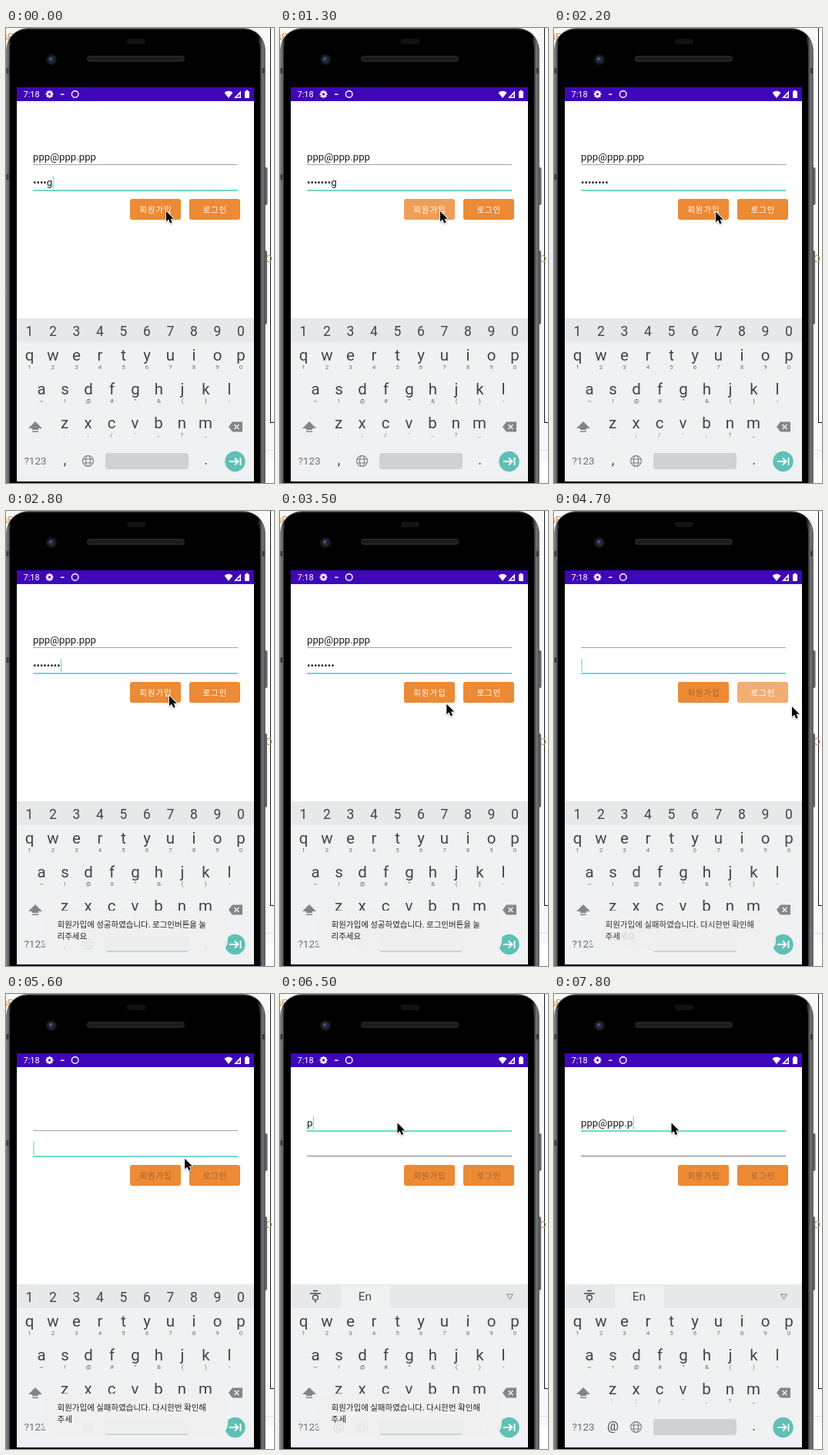
Recreate the animation shown at these times as an HTML page with a canvas. Size 348 by 591 pixels, loop 8000 ms.

```html
<!DOCTYPE html>
<html lang="ko">
<head>
<meta charset="utf-8">
<title>Sign-up demo</title>
<style>
html, body { margin: 0; width: 100%; height: 100%; overflow: hidden; background: #f8f8f8; }
canvas { display: block; width: 348px; height: 591px; }
</style>
</head>
<body>
<canvas id="stage"></canvas>
<script>
const W = 348, H = 591, LOOP = 8000, STEP = 100;
const canvas = document.getElementById('stage');
const dpr = window.devicePixelRatio || 1;
canvas.width = W * dpr;
canvas.height = H * dpr;
const c = canvas.getContext('2d');

const LATIN = 'Roboto, sans-serif';
const KOREAN = '"Noto Sans CJK KR", "Noto Sans CJK", sans-serif';
const TEAL = '#70dacd', ORANGE = '#ec8a35', KEY = '#3c474d', KEYBOARD = '#eff1f2';
const EMAIL = 'ppp@ppp.ppp';

const pointer = [
  [0, 208, 238], [2000, 208, 238], [2400, 212, 240], [3400, 212, 240],
  [3800, 240, 309], [4100, 267, 256], [4350, 275, 240], [4700, 309, 254],
  [4900, 326, 256], [5200, 300, 250], [5300, 284, 244], [6000, 152.5, 167.5], [8000, 152.5, 167.5]
];
const passwordTimes = [200, 400, 700];
const emailTimes = [6500, 6700, 6900, 7100, 7200, 7400, 7600, 7700, 7800];

const clamp = v => Math.max(0, Math.min(1, v));
const ramp = (t, a, b) => clamp((t - a) / (b - a));
const typed = (times, t) => times.filter(k => k <= t).length;
const lastBefore = (times, t, start) => times.reduce((m, k) => k <= t ? k : m, start);

function pointerAt(t) {
  const i = Math.max(1, pointer.findIndex(p => p[0] > t));
  const [t0, x0, y0] = pointer[i - 1], [t1, x1, y1] = pointer[i];
  let k = ramp(t, t0, t1);
  k = k * k * (3 - 2 * k);
  return [x0 + (x1 - x0) * k, y0 + (y1 - y0) * k];
}

function rect(x, y, w, h, color) {
  c.fillStyle = color;
  c.fillRect(x, y, w, h);
}

function round(x, y, w, h, r, color) {
  c.fillStyle = color;
  c.beginPath();
  c.roundRect(x, y, w, h, r);
  c.fill();
}

function disc(x, y, r, color) {
  c.fillStyle = color;
  c.beginPath();
  c.arc(x, y, r, 0, Math.PI * 2);
  c.fill();
}

function ring(x, y, rx, ry, color, width) {
  c.strokeStyle = color;
  c.lineWidth = width;
  c.beginPath();
  c.ellipse(x, y, rx, ry, 0, 0, Math.PI * 2);
  c.stroke();
}

function poly(points, color) {
  c.fillStyle = color;
  c.beginPath();
  points.forEach(([x, y]) => c.lineTo(x, y));
  c.closePath();
  c.fill();
}

function stroke(d, color, width = 1) {
  c.strokeStyle = color;
  c.lineWidth = width;
  c.stroke(new Path2D(d));
}

function text(s, x, y, size, color, align = 'left', font = LATIN, spacing = 0) {
  c.font = `${size}px ${font}`;
  c.fillStyle = color;
  c.textAlign = align;
  c.letterSpacing = spacing + 'px';
  c.fillText(s, x, y);
}

function drawDesk() {
  rect(0, 0, W, H, '#f8f8f8');
  rect(344, 0, 4, 513, '#fff');
  rect(343, 0, 1, 513, '#111');
  rect(343, 512, 5, 1, '#111');
  rect(336, 548, 12, 1, '#ddd');
  rect(336, 562, 12, 29, '#fff');
  text('s', -4, 16, 13, '#c49a5a');
  text('E', 2, 16, 13, '#c49a5a');
  text('O', 337, 304, 13, '#c49a5a');
}

function drawPhone() {
  round(335, 181, 4.5, 49, 2, '#626466');
  round(335, 289, 4, 96, 2, '#626466');

  const rim = c.createLinearGradient(0, 0, 337, 0);
  [[0, '#55575a'], [0.007, '#77797c'], [0.02, '#000'], [0.97, '#000'], [0.99, '#77797c'], [1, '#3c3d3f']]
    .forEach(([at, color]) => rim.addColorStop(at, color));
  round(0.5, 0, 336, 640, 28, '#66686a');
  round(0.5, 1.5, 336, 640, 27, rim);
  round(5, 3, 325, 640, 25, '#000');
  rect(0.5, 52, 3, 7, '#3a3b3c');
  rect(0.5, 190, 3, 7, '#3a3b3c');
  rect(333, 52, 3, 7, '#3a3b3c');

  round(157, 14, 24, 7, 3, '#111214');
  disc(59, 41, 7, '#15171c');
  disc(59, 41, 4.5, '#20283c');
  disc(58, 40, 2, '#48577f');
  round(105, 36, 127, 8, 4, '#252422');
  round(107, 38, 123, 4, 2, '#1c1b19');
  rect(14, 77, 308, 512, '#fff');
}

function drawStatus() {
  rect(14, 77, 308, 18, '#3f06ba');
  text('7:18', 22.5, 90, 11, '#fff');
  for (let i = 0; i < 8; i++) {
    c.save();
    c.translate(56.5, 86);
    c.rotate(i * Math.PI / 4);
    rect(-1.1, -4.9, 2.2, 3, '#fff');
    c.restore();
  }
  disc(56.5, 86, 3.7, '#fff');
  disc(56.5, 86, 1.7, '#3f06ba');
  rect(71, 85.5, 4.5, 1.5, '#fff');
  ring(89.7, 86, 4.3, 4.3, '#fff', 1.4);
  c.fillStyle = '#fff';
  c.fill(new Path2D('M283.5 84 Q289 79.500 294.500 84 L289 91Z'));
  poly([[305, 81.5], [305, 91], [296, 91]], '#fff');
  poly([[303.5, 85.5], [303.5, 89.5], [299.7, 89.5]], '#3f06ba');
  round(310, 82, 6, 9, 1, '#fff');
  rect(311.7, 80.8, 2.6, 2, '#fff');
}

function drawField(value, y, focused, dim, caret) {
  const line = y + 5;
  text(value, 35, y, 13.2, '#1d1d1d');
  const end = 35 + c.measureText(value).width;
  if (focused) rect(35, line, 266, 2, TEAL);
  else rect(35, line, 266, 1, dim);
  if (caret) rect(end + 0.4, y - 13, 1.2, 17, TEAL);
}

function drawButton(label, x, glow, disabled) {
  round(x, 222.5, 66, 27, 3, 'rgba(0,0,0,.1)');
  round(x, 222, 66, 27, 3, ORANGE);
  if (glow) round(x, 222, 66, 27, 3, `rgba(255,255,255,${glow})`);
  text(label, x + 33.4, 239.7, 10.5, disabled ? '#a5612b' : '#fff', 'center', KOREAN, 0.9);
}

function drawRow(keys, hints, x, y) {
  [...keys].forEach((k, i) => {
    text(k, x + i * 30.5, y, 20.5, KEY, 'center');
    text(hints[i], x + i * 30.5, y + 11, 8, '#687379', 'center');
  });
}

function drawGlobe(x, y) {
  const r = 7, color = '#757f84';
  ring(x, y, r, r, color, 1.1);
  ring(x, y, 3, r, color, 1.1);
  stroke(`M${x - 6.5} ${y - 2.5}h13M${x - 6.5} ${y + 2.5}h13`, color, 1.1);
}

function drawKeyboard(emailMode) {
  rect(14, 377, 308, 212, KEYBOARD);
  rect(14, 377, 308, 31, '#e6e8e9');
  if (emailMode) {
    rect(79, 378, 64, 30, KEYBOARD);
    stroke('M43 385.500h6M39 389h14M46 397.500v3.500', KEY, 1.4);
    ring(46, 394.2, 3.4, 3.2, KEY, 1.3);
    text('En', 110.5, 398, 15.5, KEY, 'center');
    stroke('M294.500 390h8l-4 6.500Z', '#7c878c', 1);
  } else {
    [...'1234567890'].forEach((k, i) => text(k, 30.5 + i * 30.5, 400, 17.5, KEY, 'center'));
  }
  drawRow('qwertyuiop', '1234567890', 30.5, 432);
  drawRow('asdfghjkl', '~!@#^&()-', 46, 476);
  drawRow('zxcvbnm', ':;/\',?_', 76, 520);

  poly([[38, 511], [47, 520], [42, 520], [42, 522], [34, 522], [34, 520], [29, 520]], '#7f878b');
  rect(34, 523.5, 8, 1.5, '#7f878b');
  poly([[289, 518], [294, 511.5], [307, 511.5], [307, 524.5], [294, 524.5]], '#7f878b');
  stroke('M296.500 515l6 6M302.500 515l-6 6', KEYBOARD, 1.5);

  text('?123', 38, 567, 13.5, '#687379', 'center');
  text(emailMode ? '@' : ',', 76.5, 567, emailMode ? 16.5 : 18, KEY, 'center');
  drawGlobe(106.5, 562.5);
  round(129, 552, 108, 21, 3, '#cdd3d5');
  text('.', 259.5, 567, 18, KEY, 'center');
  disc(297.5, 563, 13.2, '#5fc0b5');
  stroke('M290 563h11M297 558.500l4.500 4.500l-4.500 4.500M304.500 558v10', '#fff', 1.8);
}

function drawToast(t) {
  const shown = Math.min(ramp(t, 2200, 2800) * 0.88 + ramp(t, 2800, 3500) * 0.08, 1 - ramp(t, 6450, 6900));
  if (shown <= 0) return;
  c.globalAlpha = shown;
  round(49, 519, 239, 52, 12, '#f1f1f1');

  const swap = ramp(t, 4400, 4750);
  const fade = Math.min(1, ramp(t, 2200, 2600), 1 - ramp(t, 6500, 6900));
  const message = (a, b, alpha) => {
    c.globalAlpha = alpha * fade;
    text(a, 66.5, 540.5, 10.5, '#202020', 'left', KOREAN);
    text(b, 66.5, 556, 10.5, '#202020', 'left', KOREAN);
  };
  if (swap < 1) message('회원가입에 성공하였습니다. 로그인버튼을 눌', '리주세요', 1 - swap);
  if (swap > 0) message('회원가입에 실패하였습니다. 다시한번 확인해', '주세', swap);
  c.globalAlpha = 1;
}

function drawPointer(t) {
  c.save();
  c.translate(...pointerAt(t));
  c.scale(0.86, 0.86);
  const arrow = new Path2D('M0 0V15.500L3.600 12.200L6.100 18L8.900 16.800L6.500 11.200H11.300Z');
  c.shadowColor = 'rgba(0,0,0,.3)';
  c.shadowBlur = 2 * dpr;
  c.shadowOffsetY = dpr;
  c.lineJoin = 'round';
  c.lineWidth = 2;
  c.strokeStyle = '#fff';
  c.stroke(arrow);
  c.shadowColor = 'transparent';
  c.fillStyle = '#000';
  c.fill(arrow);
  c.restore();
}

function draw(t) {
  c.setTransform(dpr, 0, 0, dpr, 0, 0);
  drawDesk();
  drawPhone();
  drawStatus();

  const cleared = t >= 4500, emailMode = t >= 6200;
  const count = 5 + typed(passwordTimes, t);
  const masked = t >= 2200;
  const password = cleared ? '' : '•'.repeat(masked ? count : count - 1) + (masked ? '' : 'g');
  const email = cleared ? EMAIL.slice(0, typed(emailTimes, t)) : EMAIL;

  // The caret restarts its blink after each edit.
  const edit = emailMode ? lastBefore(emailTimes, t, 6200) : cleared ? 4500 : lastBefore(passwordTimes, t, 0);
  const caret = (t - edit) % 1000 < 500;
  drawField(email, 172, emailMode, '#a3a3a3', emailMode && caret);
  drawField(password, 205, !emailMode, '#777', !emailMode && caret);

  const signGlow = 0.17 * Math.min(ramp(t, 950, 1150), 1 - ramp(t, 1300, 1400));
  const loginGlow = 0.3 * Math.min(ramp(t, 4300, 4500), 1 - ramp(t, 4750, 5100));
  drawButton('회원가입', 161, signGlow, cleared);
  drawButton('로그인', 238, loginGlow, t >= 4900);

  drawKeyboard(emailMode);
  drawToast(t);
  drawPointer(t);
}

const start = performance.now();
function tick() {
  const t = (performance.now() - start) % LOOP;
  draw(Math.floor(t / STEP) * STEP);
  requestAnimationFrame(tick);
}
tick();
</script>
</body>
</html>
```
